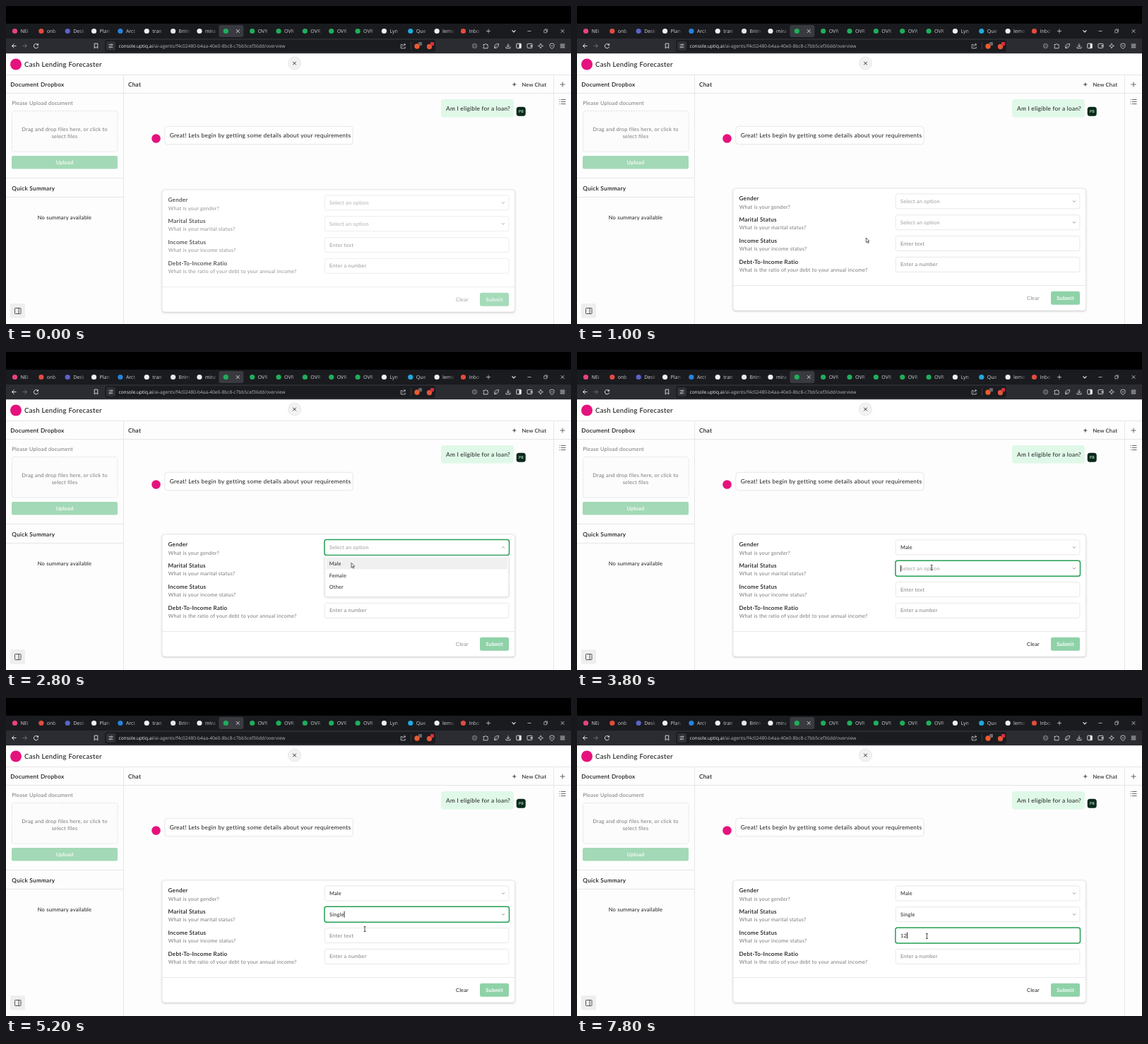
Animation, 800 px wide and 450 px high, one loop 8000 ms. Source, as an HTML page with a canvas:

```html
<!DOCTYPE html>
<html lang="en">
<head>
<meta charset="utf-8">
<title>Loan chat</title>
<style>
html, body { margin: 0; width: 100%; height: 100%; overflow: hidden; background: #fff; }
canvas { display: block; width: 800px; height: 450px; }
</style>
</head>
<body>
<canvas id="stage"></canvas>
<script>
const LOOP = 8000, STEP = 200;
const UI = 'Lato, "Open Sans", sans-serif';
const CHROME = '"Open Sans", "Noto Sans", sans-serif';
const INK = '#1c1c1c', GREY = '#777', HINT = '#808080', LINE = '#e6e6e6', GREEN = '#22a052', PINK = '#e5127d';

const canvas = document.getElementById('stage');
const ctx = canvas.getContext('2d');
const ratio = window.devicePixelRatio || 1;
canvas.width = 800 * ratio;
canvas.height = 450 * ratio;

function text(str, x, y, size, color = INK, { weight = 400, align = 'left', font = UI } = {}) {
  ctx.font = `${weight} ${size}px ${font}`;
  ctx.letterSpacing = font === UI ? `${size * 0.03}px` : '0px';
  ctx.textRendering = 'geometricPrecision';
  ctx.textAlign = align;
  ctx.fillStyle = color;
  ctx.fillText(str, x, y);
  return ctx.measureText(str).width;
}

function rect(x, y, w, h, color) {
  ctx.fillStyle = color;
  ctx.fillRect(x, y, w, h);
}

function box(x, y, w, h, r, fill, stroke, lw = 1) {
  ctx.beginPath();
  ctx.roundRect(x, y, w, h, r);
  if (fill) { ctx.fillStyle = fill; ctx.fill(); }
  if (stroke) { ctx.strokeStyle = stroke; ctx.lineWidth = lw; ctx.stroke(); }
}

function disc(x, y, r, fill, stroke, lw = 1) {
  ctx.beginPath();
  ctx.arc(x, y, r, 0, Math.PI * 2);
  if (fill) { ctx.fillStyle = fill; ctx.fill(); }
  if (stroke) { ctx.strokeStyle = stroke; ctx.lineWidth = lw; ctx.stroke(); }
}

// Strokes an SVG path with its origin moved to x, y.
function icon(x, y, d, color, lw = 1, fill) {
  ctx.save();
  ctx.translate(x, y);
  const p = new Path2D(d);
  if (fill) { ctx.fillStyle = fill; ctx.fill(p); }
  ctx.strokeStyle = color;
  ctx.lineWidth = lw;
  ctx.stroke(p);
  ctx.restore();
}

function shadow(blur, dy, color) {
  ctx.shadowBlur = blur * ratio;
  ctx.shadowOffsetY = dy * ratio;
  ctx.shadowColor = color;
}

const noShadow = () => shadow(0, 0, 'transparent');
const CROSS = 'M-2.3-2.3L2.3 2.3M2.3-2.3L-2.3 2.3';
const PLUS = 'M-3 0H3M0-3V3';
const DOWN = 'M-2-1L0 1L2-1';
const UP = 'M-2 1L0-1L2 1';

const TABS = [
  ['NEi', '#e8437f'], ['onb', '#e34b3f'], ['Desk', '#5b63c8'], ['Plan', '#f0f0f0'], ['Arct', '#2583dc'],
  ['tran', '#f0f0f0'], ['Brim', '#e6e6e6'], ['mira', '#f0f0f0'], ['', '#1fae5b'],
  ['OVR', '#1fae5b'], ['OVR', '#1fae5b'], ['OVR', '#1fae5b'], ['OVR', '#1fae5b'], ['OVR', '#1fae5b'],
  ['Lyn', '#f0f0f0'], ['Que', '#20a9dc'], ['lemo', '#f0f0f0'], ['Inbo', '#e34b3f']
];

function drawTabs() {
  rect(0, 0, 800, 25, '#000');
  rect(0, 25, 800, 21, '#1a1b1f');
  TABS.forEach(([name, color], i) => {
    const x = 12.5 + i * 37.35;
    if (!name) {
      box(x - 10, 27, 35, 17, 3, '#393a40');
      icon(x + 17, 35.5, CROSS, '#e8e8e8', 0.9);
    } else {
      const fade = ctx.createLinearGradient(x + 16, 0, x + 26, 0);
      fade.addColorStop(0, '#d6d6d9');
      fade.addColorStop(1, 'rgba(214,214,217,0)');
      text(name, x + 8, 38, 7, fade, { font: CHROME });
    }
    disc(x, 35.5, 3.6, color);
  });
  icon(683, 35.5, PLUS, '#c8c8cb', 0.8);
  icon(719, 35.5, 'M-2.5-1.2L0 1.3L2.5-1.2', '#eee', 1.2);
  icon(741, 35.5, 'M-2.5 0H2.5', '#ccc', 0.8);
  icon(764, 35.5, 'M-2.3-1.5H1.5V2.3H-2.3ZM-1-1.5V-2.6H2.6V1H1.5', '#bbb', 0.7);
  icon(788, 35.5, CROSS, '#ddd', 0.8);
}

function drawToolbar() {
  const pale = '#d4d4d7';
  rect(0, 46, 800, 21.5, '#2b2c31');
  icon(11.5, 56.5, 'M3 0H-3M0-3L-3 0L0 3', '#e6e6e8', 1);
  icon(26.5, 56.5, 'M-3 0H3M0-3L3 0L0 3', '#68696e', 1);
  icon(42.5, 56.5, 'M2.6-1.6A3.1 3.1 0 1 0 3 1M3.1-3.3V-1.2H1', '#e6e6e8', 1);
  icon(127.5, 56.5, 'M-2.3-3.4H2.3V3.4L0 1.4L-2.3 3.4Z', '#e6e6e8', 0.9);
  box(140, 48, 468, 17, 4, '#1b1c20');
  box(142, 50, 13, 13, 3, '#303137');
  icon(148.5, 56.5, 'M-3-1.7H0M2-1.7H3M-3 1.7H-2M0 1.7H3', pale, 0.9);
  disc(149.5, 54.8, 1, null, pale, 0.8);
  disc(147.5, 58.2, 1, null, pale, 0.8);
  const host = text('console.uptiq.ai', 159.5, 59, 6.6, '#f1f1f3', { font: CHROME });
  text('/ai-agents/f4c02480-b4aa-40e0-8bc8-c7bb5cef36dd/overview', 159.5 + host, 59, 6.6, '#b4b4b9', { font: CHROME });
  icon(562.5, 56.5, 'M-1-2H-3.3V3.3H2.7V1M-1 1C-1-1 0-2 3-2M1.2-3.7L3.2-2L1.2-.2', pale, 0.8);
  rect(573, 51, 0.7, 11, '#4a4b50');
  disc(582, 57, 3.7, '#f0592b');
  box(584, 51, 5, 5, 1, '#66676d');
  disc(599.5, 57.5, 3.7, '#e2543a');
  box(601, 51, 5, 5, 1, '#d92d3c');
  disc(663.5, 56.5, 3.2, '#4a4b50', '#8d8e93', 0.8);
  icon(679, 56.5, 'M-3-2H-1A1.2 1.2 0 0 1 1.3-2H3V0A1.2 1.2 0 0 1 3 2V3.3H-3V1.5A1.1 1.1 0 0 0-3-.5Z', pale, 0.9);
  icon(694.5, 56.5, 'M-2.5 3C-4 0-2-3 3-3C3 1 1 3.5-2.5 3ZM-3 3.3L0 0', pale, 0.9);
  icon(711, 56.5, 'M0-3.3V1.2M-2-.6L0 1.4L2-.6M-3 1.2V3.2H3V1.2', pale, 0.9);
  box(722.8, 53.2, 6.5, 6.5, 0.8, null, '#eee', 0.9);
  rect(726.5, 53.2, 2.8, 6.5, '#eee');
  box(738, 53.4, 7, 6, 1, null, pale, 0.9);
  rect(742.5, 55.5, 2.6, 2, pale);
  icon(757, 56.5, 'M0-3.5L1-1L3.5 0L1 1L0 3.5L-1 1L-3.5 0L-1-1Z', pale, 0.8);
  icon(773, 56.5, 'M0-3.6L3-2.5V0C3 2 1.5 3.2 0 3.8C-1.5 3.2-3 2-3 0V-2.5ZM-1.2 0H1.2', pale, 0.8);
  icon(788, 56.5, 'M-3.3-2.3H3.3M-3.3 0H3.3M-3.3 2.3H3.3', '#eee', 0.9);
}

function drawPage() {
  rect(0, 67.5, 800, 382.5, '#fdfdfd');
  rect(0, 67.5, 800, 30, '#fff');
  rect(0, 97, 800, 1, LINE);
  rect(0, 123, 800, 1, LINE);
  rect(166, 98, 1, 352, LINE);
  rect(775, 98, 1, 352, LINE);

  disc(14, 82.5, 8, PINK);
  text('Cash Lending Forecaster', 26, 86.4, 9.6, INK, { weight: 500 });
  disc(408.5, 81, 9, '#f2f2f2', '#e4e4e4', 0.8);
  icon(408.5, 81, CROSS, '#333', 1);

  text('Document Dropbox', 6.3, 114, 8.25, INK, { weight: 600 });
  text('Chat', 173, 114, 8.25, INK, { weight: 600 });
  icon(719.8, 111, 'M-2.5 0H2.5M0-2.5V2.5', '#222', 0.9);
  text('New Chat', 730.5, 113.7, 7.5, INK, { weight: 500 });
  icon(788, 111, 'M-3.5 0H3.5M0-3.5V3.5', '#555', 0.9);
  icon(788, 135.5, 'M-2.2-3H4.5M-2.2 0H4.5M-2.2 3H4.5M-4.5-3H-3.5M-4.5 0H-3.5M-4.5 3H-3.5', '#555', 0.9);

  text('Please Upload document', 8.3, 139.6, 7.5, GREY);
  ctx.setLineDash([2, 1.6]);
  box(8.5, 148.5, 149.5, 57.5, 3, '#fcfcfc', '#d6d6d6', 0.8);
  ctx.setLineDash([]);
  text('Drag and drop files here, or click to', 83, 176.6, 7.4, '#777', { align: 'center' });
  text('select files', 83, 187.2, 7.4, '#777', { align: 'center' });
  box(8, 212, 150, 18.5, 2, '#a3d9b6');
  text('Upload', 83, 224, 7.4, '#fff', { weight: 600, align: 'center' });
  rect(0, 243, 166, 1, LINE);
  text('Quick Summary', 8.3, 261, 8.25, INK, { weight: 600 });
  rect(0, 270, 166, 1, LINE);
  text('No summary available', 83, 301.7, 7.5, INK, { align: 'center' });
  box(6, 421, 21, 20.5, 2, '#eeeeee');
  box(12.5, 427.5, 8.5, 8, 0.8, null, '#444', 0.9);
  rect(17.6, 427.5, 0.9, 8, '#444');

  box(616, 132, 103, 25.5, 4, '#e0f8e8');
  text('Am I eligible for a loan?', 623, 147.6, 8.35);
  box(722.7, 142.7, 13, 13, 3.5, '#0a2a1c');
  text('PB', 729.3, 151.1, 5.4, '#c4f0d5', { weight: 500, align: 'center' });
  disc(212.5, 187.5, 6.3, PINK);
  box(224.8, 170.3, 266.4, 25.5, 4, '#fff', LINE);
  text('Great! Lets begin by getting some details about your requirements', 231.7, 186, 8.35);
}

const FIELDS = [
  ['Gender', 'What is your gender?', 'Select an option', ['Male', 'Female', 'Other']],
  ['Marital Status', 'What is your marital status?', 'Select an option', ['Single', 'Married', 'Divorced']],
  ['Income Status', 'What is your income status?', 'Enter text'],
  ['Debt-To-Income Ratio', 'What is the ratio of your debt to your annual income?', 'Enter a number']
];

const within = (t, a, b) => t >= a && t < b;

function formState(t) {
  return {
    values: [t >= 3000 ? 'Male' : '', t >= 5000 ? 'Single' : '', t >= 7800 ? '12' : '', ''],
    focus: t < 1800 ? -1 : t < 3800 ? 0 : t < 5600 ? 1 : 2,
    open: within(t, 2000, 3000) ? 0 : within(t, 4000, 5000) ? 1 : -1,
    caret: within(t, 1800, 2200) || within(t, 3000, 3400) || within(t, 3800, 4200) ||
      within(t, 5000, 6400) || within(t, 6800, 7400) || t >= 7800
  };
}

const rowY = i => 276.4 + i * 29.8;

function drawField(i, s) {
  const [title, hint, empty, options] = FIELDS[i];
  const y = rowY(i), value = s.values[i], focused = s.focus === i;
  text(title, 229.5, y - 1.3, 8.15, INK, { weight: 600 });
  text(hint, 229.7, y + 10.2, 7.3, GREY);
  if (focused) box(450.9, y - 11, 261.6, 22, 3, '#fff', GREEN, 1.5);
  else box(451.3, y - 10.5, 260.6, 21, 2.5, '#fff', LINE, 0.9);
  const hintColor = options ? '#999' : HINT;
  const w = text(value || empty, 458, y + 2.6, 7.35, value ? INK : hintColor);
  if (focused && s.caret) rect(458 + (value ? w : 0), y - 4.5, 0.9, 9, '#111');
  if (options) icon(704, y, s.open === i ? UP : DOWN, '#888', 0.9);
}

function drawMenu(i) {
  const y = rowY(i);
  shadow(3, 1, 'rgba(0,0,0,.1)');
  box(451.3, y + 12, 260.6, 58, 2.5, '#fff', LINE, 0.8);
  noShadow();
  rect(454, y + 14.8, 256, 16.2, '#f0f0f0');
  FIELDS[i][3].forEach((name, k) => text(name, 457.7, y + 25.6 + k * 16.7, 7.35, '#222'));
}

function drawForm(t) {
  const s = formState(t), fresh = t < STEP;
  ctx.save();
  if (fresh) ctx.translate(0, 2);
  shadow(3, 1, 'rgba(0,0,0,.22)');
  box(221, 258, 499.5, 173, 4, '#fff');
  noShadow();
  box(221, 258, 499.5, 173, 4, null, '#e4e4e4', 0.8);
  if (fresh) ctx.globalAlpha = 0.8;
  FIELDS.forEach((_, i) => drawField(i, s));
  rect(221, 395, 499.5, 0.9, LINE);
  text('Clear', 646, 416, 7.4, t < 3000 ? '#8a8a8a' : INK, { align: 'center' });
  box(671, 403.7, 41, 19, 2.5, '#8fd2a8');
  text('Submit', 691.6, 416, 7.4, '#fff', { weight: 700, align: 'center' });
  if (s.open >= 0) drawMenu(s.open);
  ctx.restore();
}

// time, x, y
const PATH = [
  [600, 350, 352], [1000, 409.3, 328], [1600, 492, 280], [1800, 498, 277], [2200, 496, 280],
  [2600, 489, 298.5], [3000, 489, 298.5], [3600, 502, 305], [4200, 502, 305], [4800, 508, 327],
  [5200, 508, 327], [5600, 511.4, 338], [6400, 511.4, 338], [6800, 495.4, 337], [8000, 495.4, 337]
];

function pointer(t) {
  const k = PATH.findIndex(p => p[0] > t);
  const [t0, x0, y0] = PATH[k - 1], [t1, x1, y1] = PATH[k];
  const u = (t - t0) / (t1 - t0), e = u * u * (3 - 2 * u);
  return [x0 + (x1 - x0) * e, y0 + (y1 - y0) * e];
}

function drawPointer(t) {
  if (t < PATH[0][0]) return;
  const [x, y] = pointer(t);
  const overList = within(t, 2200, 3200) || within(t, 4400, 5000);
  if (t < 1600 || overList) {
    icon(x, y, 'M0 0V6.6L1.5 5.2L2.6 7.6L3.7 7.1L2.6 4.8H4.7Z', '#222', 0.7, '#fff');
  } else {
    icon(x, y, 'M-1.5-3.4H1.5M0-3.4V3.4M-1.5 3.4H1.5', '#222', 0.8);
  }
}

function frame(now) {
  const t = Math.floor((now % LOOP) / STEP) * STEP;
  ctx.setTransform(ratio, 0, 0, ratio, 0, 0);
  drawTabs();
  drawToolbar();
  drawPage();
  drawForm(t);
  drawPointer(t);
  requestAnimationFrame(frame);
}

requestAnimationFrame(frame);
</script>
</body>
</html>
```
